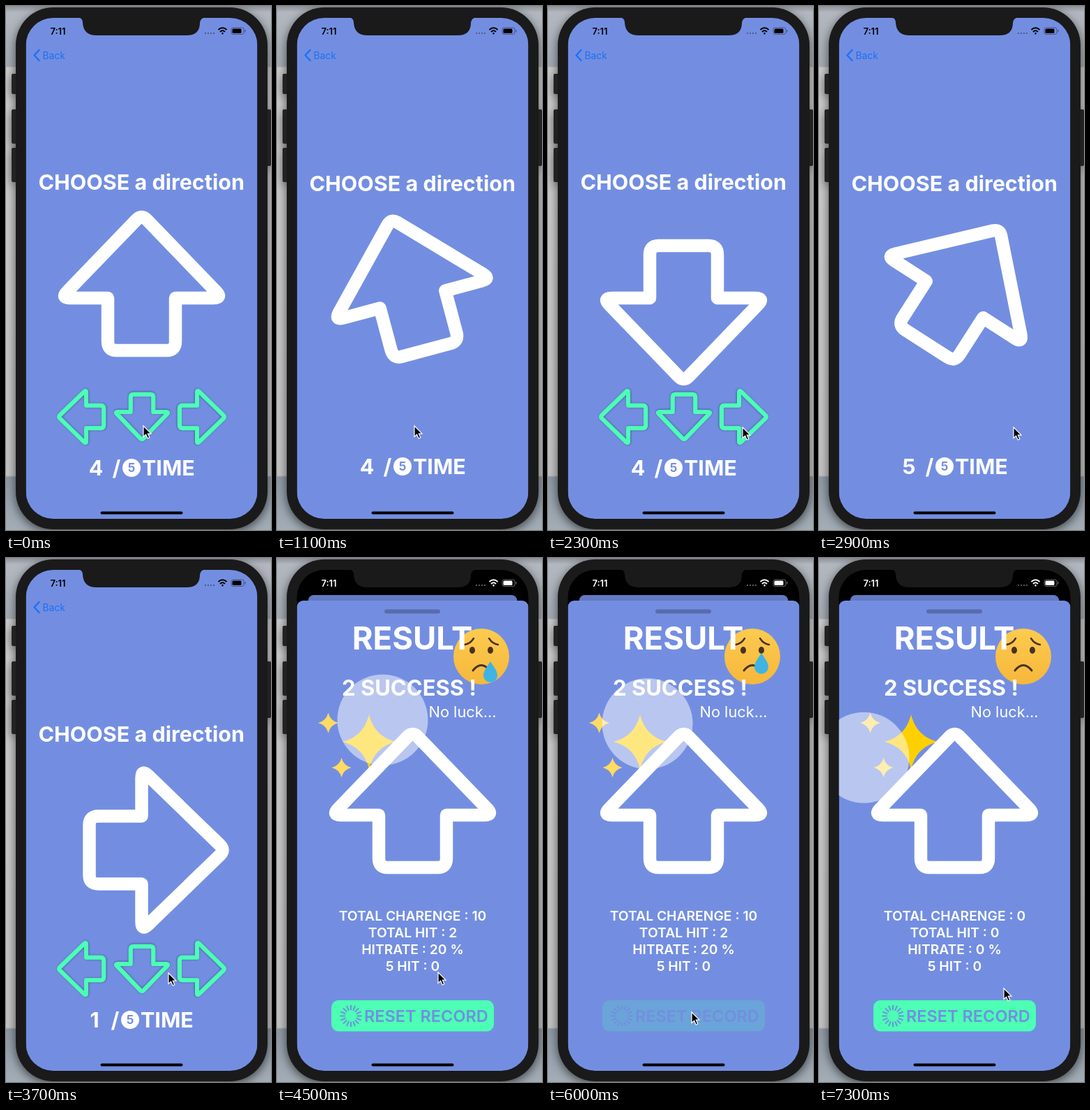
Write an HTML page that moves like this. It is 380x750 px and loops after 7.4 s.

```html
<!DOCTYPE html>
<html lang="en">
<head>
<meta charset="utf-8">
<title>Choose a direction</title>
<style>
html, body { margin: 0; width: 100%; height: 100%; overflow: hidden; background: #aeb4bc; }
svg { display: block; width: 380px; height: 750px; font-family: Inter, Roboto, sans-serif; font-weight: 600; }
.white { fill: #fff; }
.bold { font-weight: 700; }
.mid { text-anchor: middle; }
.pad { filter: drop-shadow(0 2px 4px rgba(20, 35, 90, .5)); }
.phone { filter: drop-shadow(0 4px 7px rgba(0, 0, 0, .6)); }
</style>
</head>
<body>
<svg viewBox="0 0 380 750">
  <defs>
    <clipPath id="screen"><rect x="28.500" y="17" width="332" height="717" rx="39"/></clipPath>
    <path id="arrow" d="M-7-112.500Q0-119.500 7-112.500L107-9Q115.500 0 103 0H48.500V62Q48.500 75 36 75H-36Q-48.500 75-48.500 62V0H-103Q-115.500 0-107-9Z"
      fill="none" stroke-width="18.500" stroke-linejoin="round"/>
    <path id="spark" d="M0-1Q.2-.2 1 0Q.2.2 0 1Q-.2.2-1 0Q-.2-.2 0-1Z"/>
    <linearGradient id="band" x2="0" y2="1">
      <stop offset="0" stop-color="#8b9097"/><stop offset=".012" stop-color="#b3b8c0"/>
      <stop offset=".115" stop-color="#a5abb3"/><stop offset=".118" stop-color="#cbcbcb"/>
      <stop offset=".896" stop-color="#c3c3c3"/><stop offset=".899" stop-color="#8e99a5"/>
      <stop offset="1" stop-color="#a3adb6"/>
    </linearGradient>
    <linearGradient id="face" x2="0" y2="1">
      <stop offset="0" stop-color="#fccb4e"/><stop offset="1" stop-color="#f6b73c"/>
    </linearGradient>
  </defs>

  <rect width="380" height="750" fill="url(#band)"/>
  <g class="phone">
    <g fill="#222">
      <rect x="8" y="97" width="9" height="29" rx="2"/>
      <rect x="8" y="148" width="9" height="49" rx="2"/>
      <rect x="8" y="203" width="9" height="49" rx="2"/>
      <rect x="371" y="148" width="9" height="81" rx="2"/>
    </g>
    <rect x="14" y="2" width="361" height="747" rx="54" fill="#1a1a1b"/>
  </g>

  <g clip-path="url(#screen)">
    <rect x="28" y="17" width="333" height="717"/>
    <g id="game">
      <rect id="gameBack" x="28.500" y="17" width="332" height="717" fill="#738ee1"/>
      <g fill="#1c70f5">
        <path d="M47.500 63 40.500 70.500 47.500 78" fill="none" stroke="#1c70f5" stroke-width="2.400" stroke-linecap="round" stroke-linejoin="round"/>
        <text x="52.500" y="75.500" font-size="13.800" font-weight="400">Back</text>
      </g>
      <text id="title" class="white bold mid" x="194.200" font-size="30.500">CHOOSE a direction</text>
      <use id="spinner" href="#arrow" stroke="#fff"/>
      <g id="pads" stroke="#4cffb5">
        <use class="pad" href="#arrow" transform="translate(115 588) rotate(-90) scale(.335)"/>
        <use class="pad" href="#arrow" transform="translate(195 581) rotate(180) scale(.335)"/>
        <use class="pad" href="#arrow" transform="translate(274 588) rotate(90) scale(.335)"/>
      </g>
      <g id="counter" class="white bold" font-size="30.500">
        <text id="count" class="mid" x="129"></text>
        <text x="152.500">/</text>
        <circle cx="180" cy="-11" r="13"/>
        <text class="mid" x="180" y="-5" font-size="17" fill="#738ee1">5</text>
        <text x="195">TIME</text>
      </g>
    </g>
    <rect id="dim" x="28" y="17" width="333" height="717"/>

    <g id="sheet">
      <rect x="28.500" y="61" width="332" height="690" rx="9" fill="#738ee1"/>
      <rect x="154" y="73.500" width="80" height="6" rx="3" fill="#586cae"/>
      <use href="#spark" transform="translate(132 263) scale(38 39)" fill="#ffd000"/>
      <g fill="#ffdb62">
        <use href="#spark" transform="translate(73.500 236) scale(14.500)"/>
        <use href="#spark" transform="translate(92.500 300) scale(14)"/>
      </g>
      <circle id="glow" r="65" fill="#fff" opacity=".5"/>
      <circle cx="293" cy="141" r="40" fill="url(#face)"/>
      <g fill="none" stroke="#493124" stroke-linecap="round">
        <path d="M281 161Q293 146 305 161" stroke-width="3"/>
        <path d="M269 124Q277 123 282 115M304 115Q309 123 317 124" stroke-width="2.500"/>
      </g>
      <g fill="#493124"><ellipse cx="280" cy="132" rx="4" ry="5"/><ellipse cx="306" cy="132" rx="4" ry="5"/></g>
      <path id="tear" d="M0-15C4-8 10-2 10 5A10 10 0 0 1-10 5C-10-2-4-8 0-15Z" fill="#3fb4e4"/>
      <g class="white bold">
        <text class="mid" x="194" y="130.500" font-size="45.500">RESULT</text>
        <text class="mid" x="189.500" y="196.500" font-size="31">2 SUCCESS !</text>
        <text x="217.500" y="227.500" font-size="21.800" font-weight="400">No luck...</text>
      </g>
      <use href="#arrow" x="194.500" y="368" stroke="#fff"/>
      <g id="stats" class="white mid" font-size="19.300"></g>
      <g id="reset">
        <rect x="78" y="633" width="233" height="44.500" rx="10" fill="#4cffb5"/>
        <g id="rays" stroke="#738ee1" stroke-width="2" stroke-linecap="round"></g>
        <text x="125" y="664" font-size="23.500" fill="#738ee1">RESET RECORD</text>
      </g>
    </g>

    <g id="status">
      <text class="mid" x="74.500" y="40.500" font-size="13">7:11</text>
      <path d="M285 39h2m2 0h2m2 0h2m2 0h2" stroke="currentColor" stroke-width="2" opacity=".35"/>
      <g fill="none" stroke="currentColor" stroke-width="2">
        <path d="M304.500 34Q310.500 28.500 316.500 34M307 37Q310.500 33.500 314 37"/>
        <path d="M310.500 38v2.500"/>
      </g>
      <rect x="323" y="31" width="18" height="9.500" rx="2.800" fill="none" stroke="currentColor" opacity=".4"/>
      <rect x="324.500" y="32.500" width="13" height="6.500" rx="1.500"/>
      <rect x="342.300" y="34" width="1.200" height="3.500" opacity=".4"/>
    </g>
    <rect x="135.500" y="723.500" width="118" height="4" rx="2"/>
  </g>
  <path d="M103 16Q110 17 110 24Q111 42 130 42H259Q278 42 278 24Q279 17 286 16Z" fill="#1a1a1b"/>
  <path id="cursor" d="M0 0V15.500L3.600 12.200 6.200 18 8.800 16.800 6.300 11.200H11Z" stroke="#fff" stroke-width="1.200"/>
</svg>
<script>
const LOOP = 7400, STEP = 100;
const $ = id => document.getElementById(id);
const set = (id, name, value) => $(id).setAttribute(name, value);
const clamp = v => Math.max(0, Math.min(1, v));
const ramp = (t, from, to) => clamp((t - from) / (to - from));
const smooth = p => p * p * (3 - 2 * p);
const mix = (a, b, p) => a + (b - a) * p;

// time, x, y of the pointer tip
const pointer = [
  [0, 197, 601], [1900, 197, 601], [2250, 279, 603], [3200, 279, 603], [3600, 233, 594],
  [4500, 231, 593], [5100, 231, 593], [5700, 206, 650], [6400, 206, 650], [7100, 265, 616], [LOOP, 265, 616]
];

function pointerAt(t) {
  const i = pointer.findIndex(k => k[0] > t);
  const [t0, x0, y0] = pointer[i - 1], [t1, x1, y1] = pointer[i];
  const p = smooth(ramp(t, t0, t1));
  return [mix(x0, x1, p), mix(y0, y1, p)];
}

$('rays').innerHTML = Array.from({ length: 16 }, (_, i) =>
  `<path d="M0-9V-15" transform="translate(106 655.5) rotate(${i * 22.5})"/>`).join('');

function drawGame(t) {
  const padsAlpha = t < 2200 ? Math.max(1 - ramp(t, 0, 200), ramp(t, 1850, 2000))
    : Math.max(1 - ramp(t, 2350, 2500), ramp(t, 3550, 3700));
  const shift = 2 * (1 - padsAlpha);
  const count = t < 2400 ? 4 : t < 3700 ? 5 : 1;
  const angle = 540 * smooth(ramp(t, 150, 1750)) + 630 * smooth(ramp(t, 2395, 3690));
  set('pads', 'opacity', padsAlpha);
  set('title', 'y', 263 + shift);
  set('spinner', 'transform', `translate(194.5 ${418 + shift}) rotate(${angle})`);
  set('counter', 'transform', `translate(${count === 1 ? -2 : 0} ${672 - shift})`);
  $('count').textContent = count;
}

function drawSheet(t) {
  const rise = 1 - (1 - ramp(t, 3750, 4300)) ** 3;
  set('sheet', 'transform', `translate(0 ${690 * (1 - rise)})`);
  set('sheet', 'visibility', rise ? 'visible' : 'hidden');
  const scale = mix(1, .903, rise);
  set('game', 'transform', `translate(${194.5 * (1 - scale)} ${mix(17, 53, rise) - 17 * scale}) scale(${scale})`);
  set('gameBack', 'rx', 9 * rise);
  set('dim', 'opacity', .14 * rise);
  const ink = rise > .5 ? '#fff' : '#000';
  $('status').style.color = ink;
  set('status', 'fill', ink);

  const swing = Math.abs(((t - 3740 + 3000) / 1500 + 1) % 2 - 1);
  const p = smooth(swing);
  set('glow', 'cx', -75 + 444 * p);
  set('glow', 'cy', 372 - 275 * p);

  const drip = (t - 3800 + 3200) % 1600;
  set('tear', 'transform', `translate(306 ${151 + .12 * (drip - 600)})`);
  set('tear', 'opacity', ramp(drip, 400, 500) * (1 - ramp(drip, 800, 900)));

  const cleared = t >= 6200;
  const lines = [`TOTAL CHARENGE : ${cleared ? 0 : 10}`, `TOTAL HIT : ${cleared ? 0 : 2}`,
    `HITRATE : ${cleared ? 0 : 20} %`, '5 HIT : 0'];
  $('stats').innerHTML = lines.map((s, i) => `<text x="194.500" y="${518.5 + 24 * i}">${s}</text>`).join('');
  set('reset', 'opacity', 1 - .8 * ramp(t, 5850, 5950) * (1 - ramp(t, 6150, 6400)));
}

function frame(now) {
  const t = Math.floor(now % LOOP / STEP) * STEP;
  drawGame(t);
  drawSheet(t);
  set('cursor', 'transform', `translate(${pointerAt(t)})`);
  requestAnimationFrame(frame);
}
frame(0);
</script>
</body>
</html>
```
